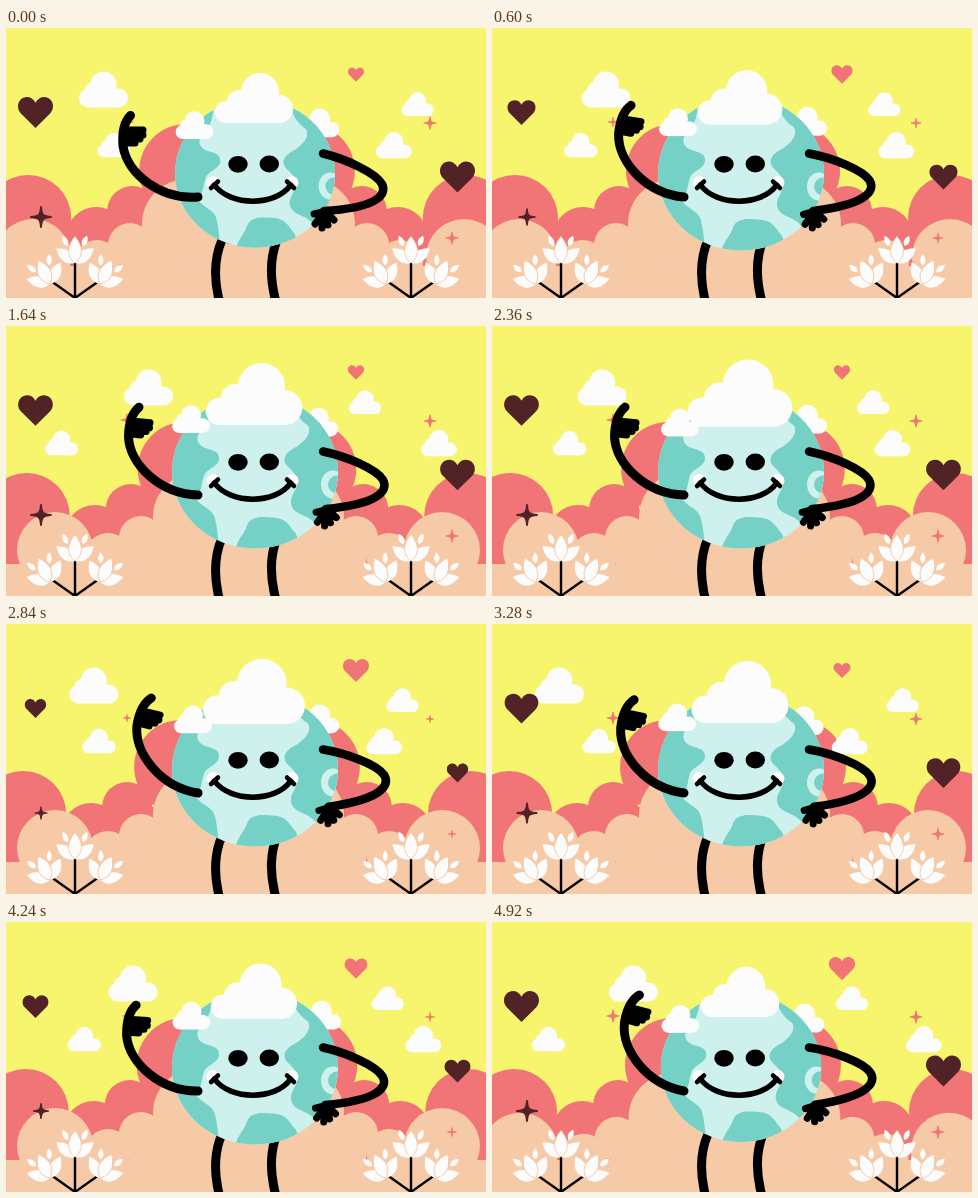
Animation of 480x270 px, one loop 4.96 s. Source, as an HTML page:

```html
<!DOCTYPE html>
<html lang="en">
<head>
<meta charset="utf-8">
<title>Happy planet</title>
<style>
html, body { margin: 0; width: 100%; height: 100%; overflow: hidden; background: #f7f56e; }
svg { display: block; width: 100vw; height: 100vh; }
</style>
</head>
<body>
<svg viewBox="0 0 480 270" preserveAspectRatio="xMidYMid slice">
  <defs>
    <g id="cloud" fill="#fcfcfc">
      <circle cy="-23" r="13"/><circle cx="-11" cy="-17" r="8"/>
      <circle cx="-15.3" cy="-9.2" r="9.2"/><circle cx="15" cy="-9.5" r="9.5"/>
      <rect x="-15.3" y="-19" width="30.3" height="19"/>
    </g>
    <path id="heart" d="M0 15.5L-14.6 1C-18.5-3-18.3-9.3-15-12.7C-10.8-17-3.2-16.3 0-9.8C3.2-16.3 10.8-17 15-12.7C18.3-9.3 18.5-3 14.6 1Z"/>
    <path id="spark" d="M0-10C.6-2 2-.6 10 0C2 .6 .6 2 0 10C-.6 2-2 .6-10 0C-2-.6-.6-2 0-10Z" stroke-width="2" stroke-linejoin="round"/>
    <path id="petal" d="M0 0C-9-7-9-17 0-28C9-17 9-7 0 0Z"/>
    <g id="flower" fill="#fcfcfc">
      <use href="#petal" transform="rotate(-52) scale(.85)"/>
      <use href="#petal" transform="rotate(52) scale(.85)"/>
      <use href="#petal" transform="scale(.95)" stroke="#f6c9a7" stroke-width="1"/>
      <use href="#petal" transform="translate(-7.5 -17) rotate(-25) scale(.4)"/>
      <use href="#petal" transform="translate(7.5 -17) rotate(25) scale(.4)"/>
    </g>
    <g id="plant">
      <path d="M0 0V-37M0 0L-24-17M0 0L24-17" fill="none" stroke="#000" stroke-width="2.4"/>
      <use href="#flower" transform="translate(-25 -14) rotate(-26)"/>
      <use href="#flower" transform="translate(25 -14) rotate(26)"/>
      <use href="#flower" transform="translate(0 -35)"/>
    </g>
    <clipPath id="globe"><ellipse rx="83" ry="77"/></clipPath>
  </defs>
  <rect width="480" height="270" fill="#f7f56e"/>
  <g id="pink" fill="#f17476"></g>
  <g id="salmon" fill="#f6c9a7"></g>
  <g id="sky"></g>
  <g id="marks"></g>
  <g fill="none" stroke="#000" stroke-width="9" stroke-linecap="round">
    <path d="M216 212C208 230 208 252 213.5 274"/>
    <path d="M271 212C263 232 264 252 270 274"/>
  </g>
  <use id="sideR" href="#cloud"/>
  <g id="earth" clip-path="url(#globe)">
    <rect x="-85" y="-80" width="170" height="160" fill="#cff1ed"/>
    <g fill="#75d1c6">
      <path d="M-90 70V-80H-42C-42-62-46-48-53-42C-60-35-59-28-51-24C-43-21-36-21-36-13C-36-5-48-3-51 4C-54 13-53 21-60 27C-52 36-42 38-40 47C-38 56-37 62-36 80Z"/>
      <path d="M-20 90C-22 70-12 66-8 54C-5 45 6 45 18 46C32 47 34 54 39 60C45 66 42 75 46 90Z"/>
      <path d="M36-80C36-62 44-52 53-46C57-38 50-31 42-25C31-20 27-13 31-7C35-2 40 0 42 8C44 18 35 23 36 32C38 44 52 42 60 52L95 40V-80Z"/>
    </g>
    <ellipse cx="78" cy="13" rx="12" ry="14" fill="#cff1ed"/>
    <ellipse cx="82" cy="13" rx="9" ry="9" fill="#75d1c6"/>
  </g>
  <use id="sideL" href="#cloud"/>
  <g id="crown" fill="#fcfcfc">
    <circle cx="6" cy="-31" r="19"/><circle cx="-15" cy="-21" r="12"/>
    <circle cx="-28" cy="-11" r="11"/><circle cx="25" cy="-14" r="14"/>
    <rect x="-28" y="-20" width="53" height="20"/>
  </g>
  <g fill="#fcfcfc"><circle cx="207" cy="154.5" r="6.5"/><circle cx="286" cy="154.5" r="6.5"/></g>
  <ellipse cx="232" cy="136.3" rx="9.7" ry="8.4"/>
  <ellipse cx="263.3" cy="136" rx="9.7" ry="8.4"/>
  <g fill="none" stroke="#000" stroke-width="5.5" stroke-linecap="round">
    <path d="M208.5 157C224 178.500 270 178.500 284.500 157"/>
    <path d="M205 160L212 153.500M281 153.500L288 160" stroke-width="4.5"/>
  </g>
  <g id="armL" fill="none" stroke="#000" stroke-width="9" stroke-linecap="round">
    <path d="M192 169C155 172 121 146 117 118C116 106 117 95 124.500 87.500"/>
    <path d="M121 102H137M121 107H137M121 111H134M122 115H129" stroke-width="7"/>
  </g>
  <g id="armR" fill="none" stroke="#000" stroke-width="8.500" stroke-linecap="round" stroke-linejoin="round">
    <path d="M317 125.500C340 131 370 145 376 156C382 168 368 180 318 183"/>
    <path d="M317 184L308 186M316 187L309 196M317 188L316 200M319 187L322 197M321 185L328 192" stroke-width="7"/>
  </g>
  <use href="#plant" x="69" y="270"/>
  <use href="#plant" x="405" y="270"/>
</svg>
<script>
const LOOP = 4960, LEG = 1655, NS = "http://www.w3.org/2000/svg";
const $ = id => document.getElementById(id);

function add(parent, tag, attrs) {
  const el = document.createElementNS(NS, tag);
  for (const k in attrs) el.setAttribute(k, attrs[k]);
  return parent.appendChild(el);
}

const place = (el, x, y, sx = 1, sy = sx) =>
  el.setAttribute("transform", `translate(${x} ${y}) scale(${sx} ${sy})`);
const turn = (el, deg, x, y) => el.setAttribute("transform", `rotate(${deg} ${x} ${y})`);

// Triangle wave from 0 to 1 and back
const tri = (t, period) => 1 - Math.abs(2 * (t / period % 1) - 1);
const cosine = (t, period, peak = 0) => Math.cos((t - peak) / period * 2 * Math.PI);
const ramp = (t, from, to) => Math.min(1, Math.max(0, (t - from) / (to - from)));
// Rises, holds at 1, then falls before the loop ends
const hold = (t, from, to) => ramp(t, from, to) * (1 - ramp(t, 4250, LOOP));

// Two long strolls, then an eased return
function drift(t) {
  const u = t % LEG / LEG;
  if (t < LEG) return 97.5 + 45.5 * u;
  if (t < 2 * LEG) return 143 - 77 * u;
  return 66 + 75.5 * (1 - (1 - u) ** 2);
}

// Mirrored bush circles: x, y, radius, reach
function bush(id, axis, base, list) {
  const g = $(id);
  add(g, "rect", { y: base, width: 480, height: 270 - base });
  add(g, "rect", { x: 124, y: base - 22, width: 236, height: 60 });
  const parts = list.map(c => [add(g, "circle", { r: c[2] }), add(g, "circle", { r: c[2] }), ...c]);
  return (shift, lift = 0) => parts.forEach(([left, right, x, y, r, reach]) => {
    const at = x + shift * reach;
    place(left, at, y - lift);
    place(right, axis - at, y - lift);
  });
}
const movePink = bush("pink", 482, 205,
  [[20, 190, 43, 1], [88, 209, 30, 1], [124, 183, 25, 1], [178, 143, 47, 1]]);
const moveSalmon = bush("salmon", 485, 238,
  [[27, 229, 38, 2], [91, 235, 23, 1], [124, 217, 22, 1], [181, 196, 45, 1]]);

const clouds = [0, 1, 2, 3].map(() => add($("sky"), "use", { href: "#cloud" }));

const BROWN = "#512327", ROSE = "#f17476";
const mark = (kind, x, y, size, fill) => {
  const el = add($("marks"), "use", { href: "#" + kind, fill, stroke: kind === "spark" ? fill : "none" });
  return scale => place(el, x, y, size * scale);
};
const pulsing = [
  mark("heart", 29.5, 84.5, 1, BROWN), mark("heart", 451.5, 149, 1, BROWN),
  mark("spark", 35, 189, 1, BROWN), mark("spark", 121, 94, .6, ROSE),
  mark("spark", 424, 95, .6, ROSE), mark("spark", 446, 210, .6, ROSE)
];
const rose = mark("heart", 350, 46.5, 1, ROSE);

function draw(t) {
  movePink(3 * cosine(t, LOOP, 600));
  const gather = hold(t, 600, 1500);
  moveSalmon(11 * gather, 5 * gather);

  const a = drift(t), b = 108 - 53 * tri(t, 2 * LEG);
  place(clouds[0], a, 79.5);
  place(clouds[1], b, 129.3, .68);
  place(clouds[2], b + 303.5, 88, .66);
  place(clouds[3], a + 290.3, 130.3, .73);

  const rest = t >= 4800;
  const beat = rest ? 0 : (1 - cosine(t, 800)) / 2;
  pulsing.forEach(scale => scale(1 - .4 * beat));
  rose(.46 + .29 * (rest ? ramp(t, 4800, 4920) : beat));

  const swell = .964 + .036 * hold(t, 0, 600);
  place($("earth"), 249, 145.5, swell);

  const k = tri(t, LOOP);
  place($("crown"), 248, 95 + 6 * k, 1 + .36 * k);
  const lift = Math.min(1, 1.5 * tri(t, LOOP / 2));
  place($("sideL"), 188.5 - 3.5 * lift, 111 - 4 * lift, .77);
  const hop = 3.5 + 3.5 * cosine(t, 1880, 480);
  place($("sideR"), 312 + hop * .5, 111 - hop * .5, .8);

  const wave = tri(t, 2000);
  turn($("armL"), 16 * wave, 192, 169);
  turn($("armR"), -5.5 * wave, 317, 125.5);
}

const start = performance.now();
function tick() {
  draw((performance.now() - start) % LOOP);
  requestAnimationFrame(tick);
}
draw(0);
requestAnimationFrame(tick);
</script>
</body>
</html>
```
